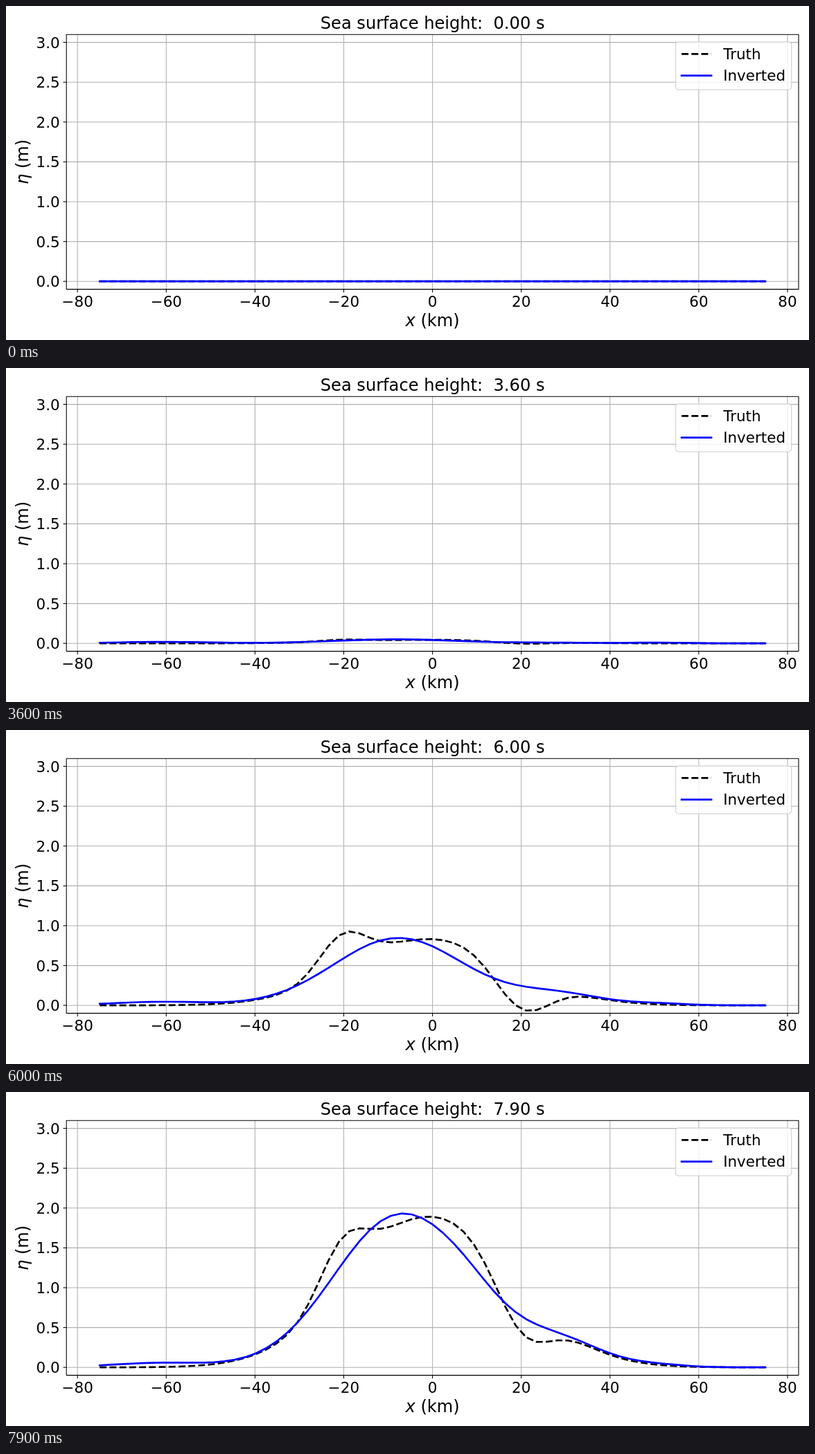
These frames come from a looping animation (1159 by 483 pixels, 8000 ms). An HTML page with a canvas:

```html
<!DOCTYPE html>
<html lang="en">
<head>
<meta charset="utf-8">
<title>Sea surface height</title>
<style>
html, body { margin: 0; width: 100%; height: 100%; overflow: hidden; background: #fff; }
canvas { display: block; }
</style>
</head>
<body>
<canvas id="plot" width="1159" height="483"></canvas>
<script>
const ctx = document.getElementById('plot').getContext('2d');
const LOOP = 8000, STEP = 100;
const PX = 0.9658;          // layout pixel
const PT = PX * 100 / 72;   // layout point
const SMALL = 16 * PT, LARGE = 18 * PT;
const BOX = { l: 87.2, r: 1144, t: 41.2, b: 409.6 };
const ONSET = 3.1;          // seconds before the surface rises
const N = 64;

const px = x => 615.6 + 6.405 * x;
const py = y => 398.2 - 115.2 * y;

const bell = (x, center, spread) => Math.exp(-((x - center) ** 2) / spread);
const ease = u => u >= 1 ? 1 : u * u * (3 - 2 * u);

// Heights in metres at x km, u seconds after the onset
function truth(x, u) {
  const ridge = ease(u / 4.1);
  return 0.153 * u ** 1.7 * bell(x, 0, 611)
    + 0.56 * ridge * bell(x, -20.4, 54)
    - 0.64 * ridge * bell(x, 19.9, 72)
    - 0.0098 * u ** 2.2 * bell(x, 1, 242);
}

function inverted(x, u) {
  return 0.154 * u ** 1.6 * bell(x, -7.7, 425)
    + 0.0053 * u * u * (u - 2.8) * bell(x, 8.5, 130)
    + 0.0233 * u ** 1.7 * bell(x, 28, 200)
    + 0.026 * Math.sqrt(u) * bell(x, -61, 242)
    + 0.013 * Math.sqrt(u) * bell(x, 51, 80);
}

function line(x1, y1, x2, y2) {
  ctx.beginPath();
  ctx.moveTo(x1, y1);
  ctx.lineTo(x2, y2);
  ctx.stroke();
}

function label(str, x, y, size, align) {
  ctx.font = `${size}px "DejaVu Sans", sans-serif`;
  ctx.textAlign = align;
  ctx.fillText(str, x, y);
}

// Italic symbol followed by its unit, centred on a point
function axisName(symbol, unit, x, y, angle) {
  const italic = `italic ${LARGE}px "DejaVu Sans", sans-serif`;
  const plain = `${LARGE}px "DejaVu Sans", sans-serif`;
  ctx.font = plain;
  const unitWidth = ctx.measureText(' ' + unit).width;
  ctx.font = italic;
  const symbolWidth = ctx.measureText(symbol).width;
  const left = -(symbolWidth + unitWidth) / 2;
  ctx.save();
  ctx.translate(x, y);
  ctx.rotate(angle);
  ctx.textAlign = 'left';
  ctx.fillText(symbol, left, 0);
  label(' ' + unit, left + symbolWidth, 0, LARGE, 'left');
  ctx.restore();
}

function pen(color, width, cap = 'butt', dash = []) {
  ctx.strokeStyle = color;
  ctx.lineWidth = width;
  ctx.lineJoin = 'round';
  ctx.lineCap = cap;
  ctx.setLineDash(dash);
}
const gridPen = () => pen('#b0b0b0', 0.8 * PT);
const framePen = () => pen('#000', 0.8 * PT);
const truthPen = () => pen('#000', 2 * PT, 'butt', [7.4 * PT, 3.2 * PT]);
const invertedPen = () => pen('#00f', 2 * PT, 'square');

function axes() {
  const tick = 3.5 * PT;
  for (let v = -80; v <= 80; v += 20) {
    const x = px(v);
    gridPen();
    line(x, BOX.t, x, BOX.b);
    framePen();
    line(x, BOX.b, x, BOX.b + tick);
    label(String(v).replace('-', '\u2212'), x, 435.2, SMALL, 'center');
  }
  for (let v = 0; v <= 3; v += 0.5) {
    const y = py(v);
    gridPen();
    line(BOX.l, y, BOX.r, y);
    framePen();
    line(BOX.l - tick, y, BOX.l, y);
    label(v.toFixed(1), 77.7, y + 8, SMALL, 'right');
  }
  axisName('x', '(km)', px(0), 463, 0);
  axisName('η', '(m)', 32.2, 225.4, -Math.PI / 2);
}

function curve(height, t) {
  const u = Math.max(0, t - ONSET);
  ctx.beginPath();
  for (let k = 0; k <= N; k++) {
    const x = -75 + 150 * k / N;
    ctx.lineTo(px(x), py(height(x, u)));
  }
  ctx.stroke();
}

function legend() {
  pen('rgba(204,204,204,0.8)', PT);
  ctx.fillStyle = 'rgba(255,255,255,0.8)';
  ctx.beginPath();
  ctx.roundRect(966.5, 51.8, 167.2, 69.3, 0.2 * SMALL);
  ctx.fill();
  ctx.stroke();
  ctx.fillStyle = '#000';
  truthPen();
  line(975.1, 69.4, 1018, 69.4);
  label('Truth', 1035.2, 76.8, SMALL, 'left');
  invertedPen();
  line(975.1, 100.7, 1018, 100.7);
  label('Inverted', 1035.2, 108.2, SMALL, 'left');
}

function draw(t) {
  ctx.fillStyle = '#fff';
  ctx.fillRect(0, 0, 1159, 483);
  ctx.fillStyle = '#000';
  axes();

  ctx.save();
  ctx.beginPath();
  ctx.rect(BOX.l, BOX.t, BOX.r - BOX.l, BOX.b - BOX.t);
  ctx.clip();
  truthPen();
  curve(truth, t);
  invertedPen();
  curve(inverted, t);
  ctx.restore();

  framePen();
  ctx.strokeRect(BOX.l, BOX.t, BOX.r - BOX.l, BOX.b - BOX.t);
  legend();
  label(`Sea surface height:  ${t.toFixed(2)} s`, px(0), 32.6, LARGE, 'center');
}

let shown = -1;
function tick(now) {
  const step = Math.floor(now % LOOP / STEP);
  if (step !== shown) {
    shown = step;
    draw(step * STEP / 1000);
  }
  requestAnimationFrame(tick);
}
tick(performance.now());
</script>
</body>
</html>
```
